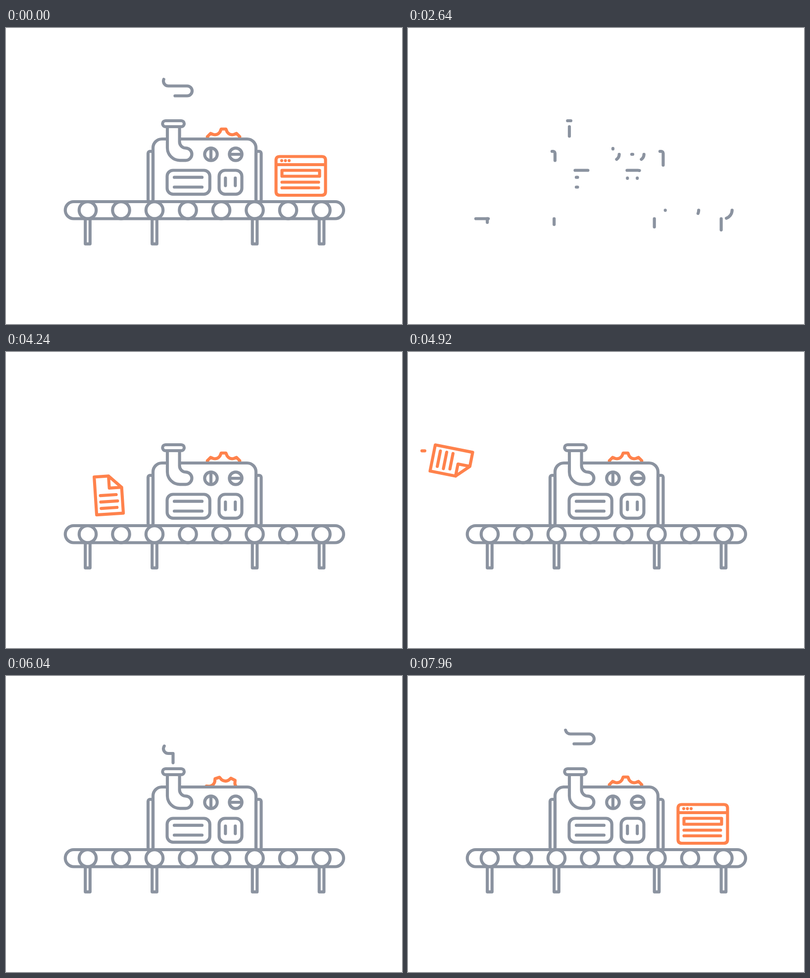
Recreate the animation shown at these times as an HTML page. Size 800 by 600 pixels, loop 8000 ms.

```html
<!DOCTYPE html>
<html lang="en">
<head>
<meta charset="utf-8">
<title>Conveyor machine</title>
<style>
html, body { margin: 0; width: 100%; height: 100%; overflow: hidden; background: #fff; }
svg { display: block; width: 800px; height: 600px; }
path { stroke-linecap: round; stroke-linejoin: round; }
</style>
</head>
<body>
<svg id="stage" viewBox="0 0 800 600" fill="none" stroke-width="6.2">
  <defs>
    <clipPath id="above"><rect width="800" height="222"/></clipPath>
    <clipPath id="leftSide"><rect width="281" height="600"/></clipPath>
    <clipPath id="rightSide"><rect x="519" width="281" height="600"/></clipPath>
  </defs>
  <g id="scene">
    <g stroke="#ff824c">
      <g clip-path="url(#above)"><g id="gear"></g></g>
      <g clip-path="url(#leftSide)">
        <path id="trail"/>
        <g id="doc">
          <path d="M-27-38.5H2L27-14V38.5H-27ZM2-38.5V-14H27M-17 0H15M-17 13H17M-17 26H15"/>
        </g>
      </g>
      <g clip-path="url(#rightSide)"><g id="page">
        <path d="M553 260.5H638Q645.5 260.5 645.5 268V331.5Q645.5 339 638 339H553Q545.5 339 545.5 331.5V268Q545.5 260.5 553 260.5ZM545.5 277H645.5"/>
        <path d="M557.5 288.5H633.5V300.5H557.5ZM557.5 312.5H631.5M557.5 324H631.5M557 268.8h.01M564.5 268.8h.01M572 268.8h.01"/>
      </g></g>
    </g>
    <g id="machine" stroke="#8b93a0"></g>
    <path id="smoke" stroke="#8b93a0" d="M337.5 177.5V157H328A10 10 0 0 1 318 147A10 10 0 0 1 328 137.5H366A10 10 0 0 0 366 117.5H328A10 10 0 0 1 318 107.5A10 10 0 0 1 328 97.7H430"/>
  </g>
</svg>
<script>
const LOOP = 8000, FADE = 1300, GONE = 1840, BUILD = 2360;
const $ = id => document.getElementById(id);
const clamp = v => Math.max(0, Math.min(1, v));
const inOut = u => u < .5 ? 2 * u * u : 1 - 2 * (1 - u) ** 2;
const cubic = u => u < .5 ? 4 * u ** 3 : 1 - 4 * (1 - u) ** 3;
const show = (el, on) => { el.style.display = on ? '' : 'none'; };

const parts = [];
function part(d, start, span, ease = inOut, parent = $('machine'), fill = 'none') {
  const el = document.createElementNS('http://www.w3.org/2000/svg', 'path');
  el.setAttribute('d', d);
  el.setAttribute('pathLength', 1);
  el.setAttribute('fill', fill);
  parent.appendChild(el);
  parts.push({ el, start, span, ease });
}

const box = (x, y, X, Y, r) => `M${x + r} ${y}H${X - r}A${r} ${r} 0 0 1 ${X} ${y + r}V${Y - r}` +
  `A${r} ${r} 0 0 1 ${X - r} ${Y}H${x + r}A${r} ${r} 0 0 1 ${x} ${Y - r}V${y + r}A${r} ${r} 0 0 1 ${x + r} ${y}Z`;
const ring = (x, y, r) => `M${x + r} ${y}A${r} ${r} 0 0 1 ${x - r} ${y}A${r} ${r} 0 0 1 ${x + r} ${y}Z`;

function gearPath(cx, cy, outer, inner) {
  const at = (r, deg) => {
    const a = deg * Math.PI / 180;
    return `${(cx + r * Math.sin(a)).toFixed(2)} ${(cy - r * Math.cos(a)).toFixed(2)}`;
  };
  let d = 'M' + at(outer, -186.5);
  for (let a = -180; a < 180; a += 45) {
    d += 'L' + at(outer, a + 6.5) + 'L' + at(inner + 2.5, a + 11.5) +
      'Q' + at(inner - 2.5, a + 22.5) + ' ' + at(inner + 2.5, a + 33.5) + 'L' + at(outer, a + 38.5);
  }
  return d + 'Z';
}

// Machine body and fittings
part('M297 352V243A18 18 0 0 1 315 225H487A18 18 0 0 1 505 243V352', 3060, 800);
part(box(287, 250, 297, 352, 4), 2440, 880);
part(box(505, 250, 515.5, 352, 4), 2400, 880);
part('M326 200V243A25.3 25.3 0 0 0 351.3 268.3H363A12.5 12.5 0 0 0 363 243.3A12.5 12.5 0 0 1 350.6 230.8V200', 2440, 880, inOut, $('machine'), '#fff');
part(box(316.3, 188, 360, 200, 6), 2480, 880);
for (const x of [414, 464]) part(ring(x, 256, 12.7), 2400, 880);
part('M414 244V268', 2520, 780);
part('M452 256H476', 2480, 780);
part(box(325.5, 288.5, 411.8, 336.8, 12), 2440, 880);
part(box(430.5, 288.5, 476.5, 336.8, 12), 2400, 880);
for (const y of [302.7, 322.5]) part(`M340 ${y}H396`, 2520, 800);
for (const x of [443.3, 463.2]) part(`M${x} 304V319.5`, 2520, 780);

// Conveyor
part('M137 386.5H664.8A17.25 17.25 0 0 0 664.8 352H137A17.25 17.25 0 0 0 137 386.5Z', 2360, 1600, cubic);
for (let i = 0; i < 8; i++) part(ring(165 + 67.5 * i, 369.3, 17.25), 3160 - 110 * i, 800);
[165, 300, 502.5, 637.5].forEach((x, i) =>
  part(`M${x - 4.8} 386.5V437.6H${x + 4.8}V386.5`, 2480 - 40 * i, 880));

part(gearPath(439.5, 246.5, 42, 34), 3480, 500, inOut, $('gear'));

// Smoke ends as [time, distance along the plume]
const head = [[5500, 0], [6040, 51], [7360, 110], [7700, 145], [7960, 181], [8000, 187], [8400, 222], [9440, 278], [9840, 296]];
const tail = [[5500, 0], [6800, 4], [7360, 20], [7700, 36], [7960, 68], [8000, 74], [8400, 125], [9440, 181], [9720, 202], [9840, 212]];
function along(keys, t) {
  for (let i = 1; i < keys.length; i++) {
    const [a, p] = keys[i - 1], [b, q] = keys[i];
    if (t <= b) return p + (q - p) * clamp((t - a) / (b - a));
  }
  return keys[keys.length - 1][1];
}

function drawSmoke(t) {
  const u = t < BUILD ? t + LOOP : t;
  show($('smoke'), u > 5500);
  const from = along(tail, u);
  $('smoke').style.strokeDasharray = `${Math.max(.01, along(head, u) - from)} 2000`;
  $('smoke').style.strokeDashoffset = -from;
}

// A sheet tumbles in once per throw, then slides behind the wall
function drawDoc(t) {
  const s = t - (t < 4840 ? 3960 : 4840);
  const on = t > 3960 && s > 0 && s < 520;
  show($('doc'), on);
  show($('trail'), on && s > 40 && s < 130);
  if (!on) return;
  const x = 39 + .6 * s;
  const y = 222 + 68 * clamp((s - 80) / 200);
  const turn = s < 80 ? 1.25 * s : Math.min(360, 100 + 1.275 * (s - 80));
  const size = s < 80 ? (s / 80) ** 1.8 : 1;
  $('doc').setAttribute('transform', `translate(${x} ${y}) rotate(${turn}) scale(${size})`);
  const end = Math.min(34, 9 + .8 * (s - 40));
  const start = Math.min(end, 9 + .475 * Math.max(0, s - 40));
  $('trail').setAttribute('d', `M${s > 79 ? Math.min(end, 28 + .15 * (s - 80)) : start} 200.3H${end}`);
}

function drawPage(t) {
  show($('page'), t < GONE || t > 7380);
  const u = t < GONE ? 1 : clamp((t - 7380) / 540);
  const k = 3.3, v = u - 1;
  const pos = 1 + (k + 1) * v ** 3 + k * v * v;
  $('page').setAttribute('transform', `translate(${-150 * (1 - pos)} 0)`);
}

function draw(t) {
  const live = t < GONE || t >= BUILD;
  show($('scene'), live);
  if (!live) return;
  $('scene').style.opacity = t < GONE ? 1 - clamp((t - FADE) / (GONE - FADE)) : 1;
  for (const { el, start, span, ease } of parts) {
    const p = t < GONE ? 1 : ease(clamp((t - start) / span));
    show(el, p > 0);
    el.style.strokeDasharray = p < 1 ? `${p} 2` : 'none';
  }
  const spin = t < GONE ? 0 : 270 * inOut(clamp((t - 5280) / 2080));
  $('gear').setAttribute('transform', `rotate(${spin} 439.5 246.5)`);
  drawSmoke(t);
  drawDoc(t);
  drawPage(t);
}

const began = performance.now();
function tick() {
  draw((performance.now() - began) % LOOP);
  requestAnimationFrame(tick);
}
tick();
</script>
</body>
</html>
```
